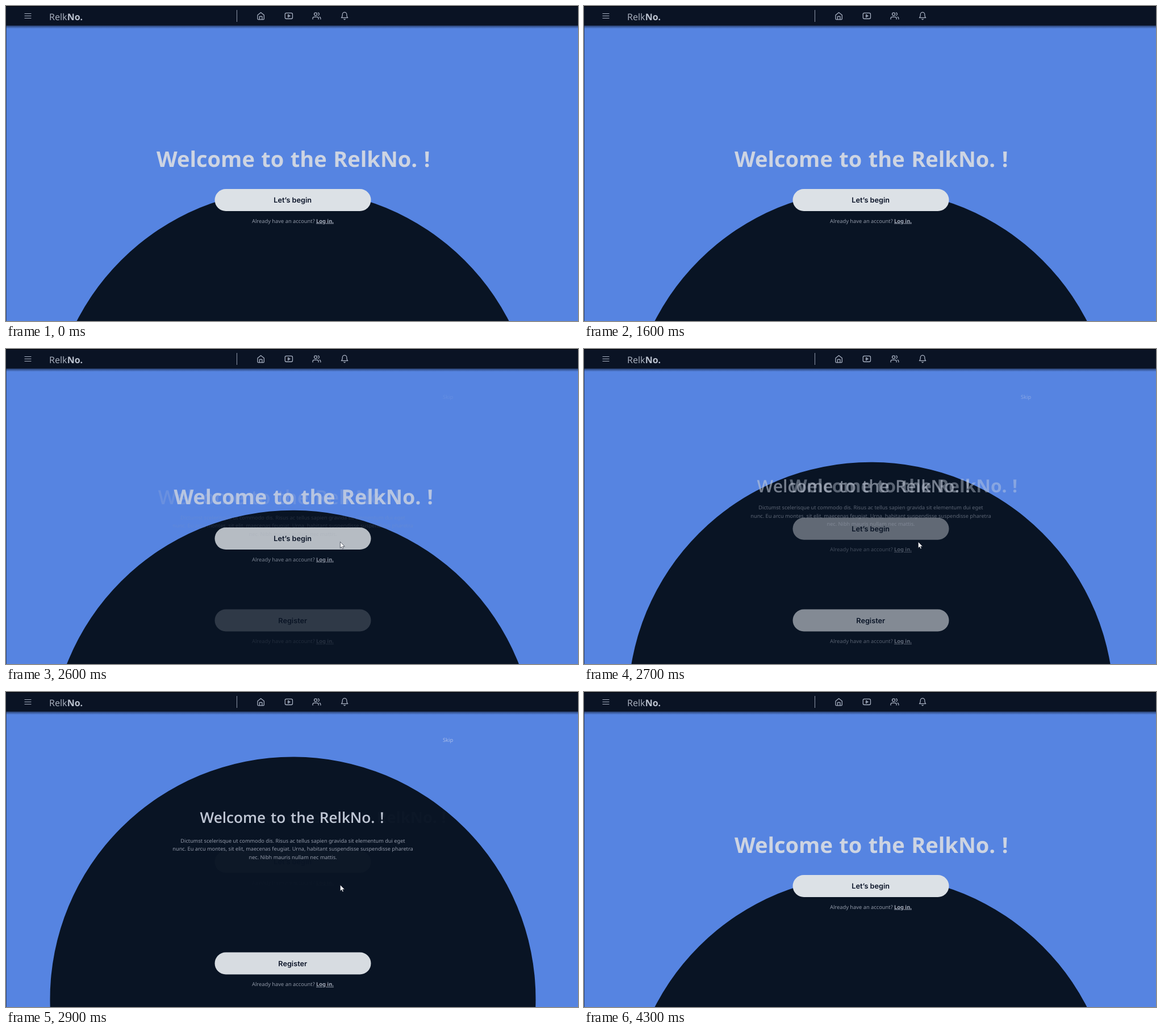
Animation of 1007x556 px, one loop 4.7 s. Source, as an HTML page:

```html
<!DOCTYPE html>
<html lang="en">
<head>
<meta charset="utf-8">
<title>Onboarding</title>
<style>
  html, body { margin: 0; width: 100%; height: 100%; overflow: hidden; background: #5684e1; }
  svg { display: block; width: 1007px; height: 556px; }
  text { font-family: "Noto Sans", "Open Sans", sans-serif; text-rendering: geometricPrecision; white-space: pre; }
  .small { font-size: 9.3px; fill: #8f97a6; }
  .link { font-weight: 600; fill: #a7aebc; text-decoration: underline; }
  .label { font: 600 12.7px Inter, sans-serif; fill: #0b1428; text-anchor: middle; }
  .para { font-size: 9.2px; fill: #959cab; text-anchor: middle; }
  .icon { fill: none; stroke: #a9b2c3; stroke-width: 2; stroke-linecap: round; stroke-linejoin: round; }
</style>
</head>
<body>
<svg viewBox="0 0 1007 556">
  <defs>
    <linearGradient id="shade" x2="0" y2="1">
      <stop offset="0" stop-color="#0a1324" stop-opacity=".65"/>
      <stop offset="1" stop-color="#0a1324" stop-opacity="0"/>
    </linearGradient>
    <g id="login">
      <text class="small" x="433">Already have an account?</text>
      <text class="small link" x="546">Log in.</text>
    </g>
    <rect id="pill" x="367.5" width="275" height="39" rx="19.5" fill="#dce1e6"/>
  </defs>

  <rect width="1007" height="556" fill="#5684e1"/>
  <circle id="hill" cx="505" r="427.5" fill="#091424"/>

  <g id="intro">
    <use href="#pill" y="323"/>
    <text class="label" x="504.7" y="347">Let’s begin</text>
    <use href="#login" y="382.5"/>
  </g>
  <text id="titleA" font-size="38" font-weight="700" word-spacing="1.6" fill="#cdd4e2">Welcome to the RelkNo. !</text>
  <text id="titleB" font-size="26" font-weight="600" word-spacing="2" fill="#c3cad8"
    style="font-family:'Open Sans','Noto Sans',sans-serif">Welcome to the RelkNo. !</text>
  <g id="about">
    <text class="para" x="505" y="265">Dictumst scelerisque ut commodo dis. Risus ac tellus sapien gravida sit elementum dui eget</text>
    <text class="para" x="505" y="279.5">nunc. Eu arcu montes, sit elit, maecenas feugiat. Urna, habitant suspendisse suspendisse pharetra</text>
    <text class="para" x="505" y="294">nec. Nibh mauris nullam nec mattis.</text>
  </g>
  <g id="signup">
    <use href="#pill" y="459.5"/>
    <text class="label" x="504.7" y="483.7">Register</text>
    <use href="#login" y="519.3"/>
    <text class="small" x="769" y="88.3" style="fill:#adbfe9">Skip</text>
  </g>

  <rect y="34" width="1007" height="6" fill="url(#shade)"/>
  <rect width="1007" height="34.5" fill="#0a1324"/>
  <rect width="1007" height="1" fill="#02050b"/>
  <rect width="1" height="556" fill="#0a1324" opacity=".55"/>
  <text x="76" y="24.5" font-size="16" fill="#a4acba">Relk<tspan font-weight="700" fill="#bcc3d0">No.</tspan></text>
  <path d="M406.5 7V28" stroke="#8d96a8"/>
  <path d="M33 13.5H44M33 17.5H44M33 21.5H44" class="icon" style="stroke-width:1.2"/>
  <g class="icon">
    <path transform="translate(441.1 9.9) scale(.63)" d="M3 9.5L12 2.5L21 9.5V20a2 2 0 0 1-2 2H5a2 2 0 0 1-2-2zM8.5 22V13.5h7V22"/>
    <path transform="translate(490.3 9.9) scale(.63)" d="M5 4H19a3.5 3.5 0 0 1 3.5 3.5V16.500a3.500 3.500 0 0 1-3.500 3.500H5a3.500 3.500 0 0 1-3.500-3.500V7.500A3.500 3.500 0 0 1 5 4zM10 8.500L15.500 12L10 15.500z"/>
    <path transform="translate(539.400 9.900) scale(.63)" d="M17 21v-2a4 4 0 0 0-4-4H5a4 4 0 0 0-4 4v2M9 3a4 4 0 1 0 0 8a4 4 0 0 0 0-8M23 21v-2a4 4 0 0 0-3-3.870M16 3.130a4 4 0 0 1 0 7.750"/>
    <path transform="translate(588.500 9.900) scale(.63)" d="M18 8a6 6 0 0 0-12 0c0 7-3 9-3 9h18s-3-2-3-9M13.730 21a2 2 0 0 1-3.460 0"/>
  </g>

  <path id="hand" transform="translate(584 339)" fill="#fff" stroke="#111722" stroke-width="1" stroke-linejoin="round"
    d="M3.300 2q0-1.500 1.300-1.500T5.900 2V7q0-1.200 1.200-1.200T8.300 7.200q.2-1 1.200-.9t1.100 1.300q.9-.8 1.500.4V12.500q0 2-1.300 3.300V17H5V15.800Q3.500 14.500 2.300 12.300L.7 9.600Q.5 8.400 1.600 8.500T3.300 10z"/>
  <path id="arrow" transform="translate(588 340)" fill="#fff" stroke="#0a1020" stroke-width=".6"
    d="M.4.4V11.400L2.900 9.100L4.400 12.700L6.200 11.900L4.700 8.400H8.200z"/>
</svg>
<script>
  const LOOP = 4700, STEP = 100, START = 2563, SPAN = 387, RESET = 4300;
  const $ = id => document.getElementById(id);
  const mix = (a, b, p) => a + (b - a) * p;
  const place = (id, x, y, scale, opacity) => {
    $(id).setAttribute("transform", `translate(${x} ${y}) scale(${scale})`);
    $(id).setAttribute("opacity", opacity);
  };
  const show = (id, on) => $(id).setAttribute("visibility", on ? "visible" : "hidden");

  function progress(t) {
    if (t >= RESET) return 0;
    const x = Math.min(1, Math.max(0, (t - START) / SPAN));
    return 1 - (1 - x) ** 2;
  }

  function draw(t) {
    const p = progress(t), base = mix(284, 230, p);
    $("hill").setAttribute("cy", mix(751, 538.5, p));
    place("intro", 0, mix(0, -43.4, p), 1, 1 - p);
    place("titleA", mix(265, 432, p), base, mix(1, 0.7125, p), 1 - p);
    place("titleB", mix(251, 343, p), base, mix(1.395, 1, p), p);
    place("about", 0, mix(43.5, 0, p), 1, p);
    place("signup", 0, 0, 1, p);
    show("hand", t >= 2400 && t < 2600);
    show("arrow", t >= 2600 && t < RESET);
  }

  function tick() {
    const t = performance.now() % LOOP;
    draw(Math.floor(t / STEP) * STEP);
    requestAnimationFrame(tick);
  }
  tick();
</script>
</body>
</html>
```
